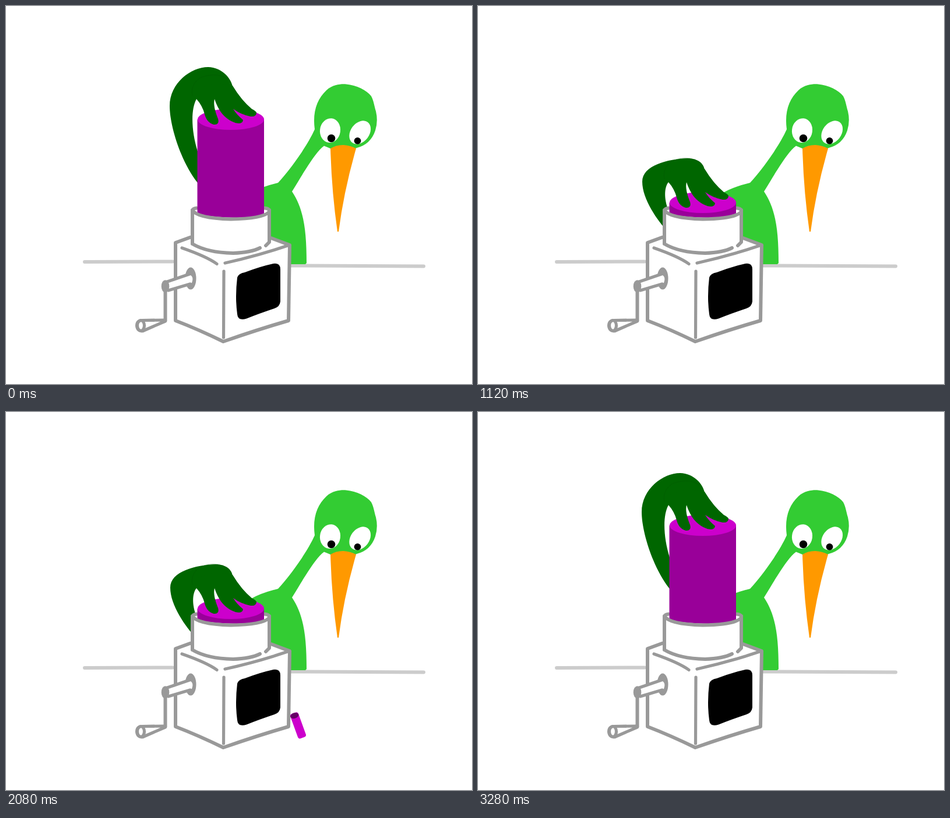
Write an HTML page that moves like this. It is 800 by 650 pixels and loops after 3360 ms.

```html
<!DOCTYPE html>
<html lang="en">
<head>
<meta charset="utf-8">
<title>Bird with a grinder</title>
<style>
  html, body { margin: 0; width: 100%; height: 100%; overflow: hidden; background: #fff; }
  svg { display: block; width: 800px; height: 650px; }
  .line { fill: none; stroke: #999; stroke-width: 6; stroke-linecap: round; stroke-linejoin: round; }
  .thin { stroke-width: 5.2; }
  .ground { stroke: #ccc; stroke-width: 6; stroke-linecap: round; }
  .bird { fill: #3c3; }
  .arm { fill: #060; }
  .white { fill: #fff; }
</style>
</head>
<body>
<svg viewBox="0 0 800 650">
  <path class="ground" d="M135,440 L286,439.5 M490,446.5 L717,447.5"/>

  <!-- bird -->
  <path class="bird" d="M530,212 C526,182 534,160 550,145 C562,134 577,134 584,134.5 C602,136 619,145 627,155
    C632,165 632,172 635,181 Q639,198 634,214 Q626,238 602,244 L580,254 L557,245 L546,240.5
    C533,250 517,276 491,319 C511,349 516,385 516,442 L514,444 L470,444 L430,400 L415,345 L421,321
    Q438,311 467,304 C490,279 518,239 530,212 Z"/>
  <ellipse class="white" cx="556.5" cy="214" rx="17.5" ry="21" transform="rotate(8 556 214)"/>
  <ellipse class="white" cx="608" cy="217.5" rx="16" ry="22" transform="rotate(37 608 217)"/>
  <circle cx="558.5" cy="227.5" r="6.8"/>
  <circle cx="603.5" cy="231.8" r="5.9"/>
  <path fill="#f90" d="M557,245 Q566,239 579,239 Q592,240 601,245 Q580,318 571,388 L569,388 Q559,318 557,245 Z"/>

  <!-- arm, then the neck of the grinder and the cylinder in it -->
  <path id="arm" class="arm"/>
  <path class="white" d="M320,352 Q324,347 330,348 L443,348 L452,352 L452,408 L320,408 Z"/>
  <path class="line" d="M320,352 Q321,348 327,347.5 M444,347.5 Q450,348 452,351"/>
  <path id="side" fill="#909"/>
  <ellipse id="lid" cx="386" rx="57" ry="18" fill="#c0c"/>

  <!-- grinder -->
  <path class="white" d="M291,407 L319,396 L452,398 L487,411 L485,541 L373,577 L291,541 Z"/>
  <path class="white" d="M320,350 Q332,365 386,367 Q442,366 452,353 V408 Q430,425 388,425 Q345,424 320,408 Z"/>
  <path class="line" d="M320,409 V351 Q328,365 386,366.5 Q440,366 452,354 V351 V406 L446,412
    M320,409 Q345,424 390,425 Q420,424 436,416
    M317,397.5 L291,407 V541 Q330,556 373,577 Q430,557 485,541 L487,411 L455,399"/>
  <path class="line thin" d="M302,416 Q345,431 362,443.5 M376,442 Q434,429 485,411.5 M374,456 L373.5,570"/>
  <path d="M397,467 Q399,460 410,458 Q436,448 459,443 Q471,441 471,453 L471,508 Q470,517 461,520
    Q434,529 413,537.5 Q398,542 397,530 Q393,500 397,467 Z"/>

  <!-- crank -->
  <ellipse cx="317" cy="468.5" rx="9.5" ry="19" fill="#999"/>
  <path class="white" d="M275,478 L315,462 Q323,465 319,476 L280,487 Z"/>
  <path class="line thin" d="M274,475 L315,461 M279,489 L316,478"/>
  <ellipse cx="273.5" cy="482" rx="6.8" ry="10.8" fill="#999"/>
  <path id="rod" class="line"/>
  <g id="grip">
    <path class="line thin" style="fill:#fff" d="M0,-1 L-40,-.5 Q-49,0 -49,9 Q-48,18 -39,18 L0,1 Z"/>
    <ellipse class="line thin" cx="-42" cy="8.5" rx="6" ry="9"/>
  </g>

  <!-- hand in front -->
  <g id="hand">
    <path class="arm" d="M327,160 Q337,171 341,186 Q345,201 357,204 Q367,204 364,194 Q355,172 358,160
      C364,178 374,194 394,201 Q406,204 407,196 Q396,187 390,177 Q404,187 420,190 Q430,191 430,183
      Q428,180 422,177 Q404,162 389,137 L360,132 L327,142 Z"/>
    <path fill="none" stroke="#005800" stroke-dasharray="1 1" d="M320,154 C318,142 321,132 334,123 Q362,113 381,126"/>
  </g>

  <g id="pill">
    <rect x="-22.5" y="-7.3" width="45" height="14.6" rx="4" fill="#c0c"/>
    <ellipse cx="-18" rx="4.8" ry="7.3" fill="#606"/>
  </g>
</svg>
<script>
const LOOP = 3360, TICK = 80, TRAVEL = 143;
const $ = id => document.getElementById(id);
const set = (id, name, value) => $(id).setAttribute(name, value);

// Each row: tick, then the values reached there.
const press = [[4, 0], [5, 28], [6, 47], [12, TRAVEL], [26, TRAVEL], [31, 0]];
const flight = [   // x, y, angle, scale
  [20, 418, 468, 35, .5], [22, 438.5, 489, 50, 1], [26, 501.5, 539, 70, 1],
  [28, 522, 562, 92, 1], [31, 563.5, 515.5, 130, 1], [32, 588, 498, 140, 1],
  [33, 615, 484, 149, 1], [35, 669, 470, 165, 1], [39, 778, 483, 190, 1], [40, 806, 484, 192, 1]
];

function track(keys, tick) {
  const next = keys.findIndex(k => k[0] > tick);
  if (next === 0) return keys[0].slice(1);
  if (next < 0) return keys[keys.length - 1].slice(1);
  const a = keys[next - 1], b = keys[next];
  const u = (tick - a[0]) / (b[0] - a[0]);
  return a.slice(1).map((v, i) => v + (b[i + 1] - v) * u);
}

// The arm bends from raised (p = 0) to pressed down (p = 1).
function armPath(p) {
  const at = (x0, y0, x1, y1) => `${x0 + (x1 - x0) * p},${y0 + (y1 - y0) * p} `;
  return 'M' + at(329, 304, 329, 392) +
    'C' + at(300, 268, 307, 368) + at(281, 205, 282, 332) + at(281, 172, 282, 302) +
    'C' + at(281, 132, 282, 274) + at(318, 105, 326, 263) + at(347, 105, 360, 262) +
    'C' + at(370, 106, 378, 262) + at(385, 122, 387, 271) + at(389, 138, 389, 281) +
    'L' + at(360, 160, 360, 303) + 'L' + at(327, 160, 327, 303) +
    'C' + at(317, 178, 319, 312) + at(318, 215, 319, 335) + at(329, 250, 329, 356) + 'Z';
}

function draw(tick) {
  const [drop] = track(press, tick);
  const top = 195 + drop;
  set('arm', 'd', armPath(drop / TRAVEL));
  set('hand', 'transform', `translate(0 ${drop})`);
  set('lid', 'cy', top);
  set('side', 'd', `M328.5,${top} H443 V361 Q386,368 328.5,358 Z`);

  const turn = Math.min(Math.max(tick - 14, 0) * 32, 360) * Math.PI / 180;
  const x = 273.5 + 28 * Math.sin(turn);
  const y = 484 + 57 * Math.cos(turn) + 11.5 * Math.sin(turn);
  set('rod', 'd', `M273.5,486 L${x},${y}`);
  set('grip', 'transform', `translate(${x} ${y})`);

  const [px, py, angle, size] = track(flight, tick);
  set('pill', 'visibility', tick >= 20 && tick <= 40 ? 'visible' : 'hidden');
  set('pill', 'transform', `translate(${px} ${py}) rotate(${angle}) scale(${size})`);
}

const start = performance.now();
function frame() {
  draw(Math.floor((performance.now() - start) % LOOP / TICK));
  requestAnimationFrame(frame);
}
frame();
</script>
</body>
</html>
```
